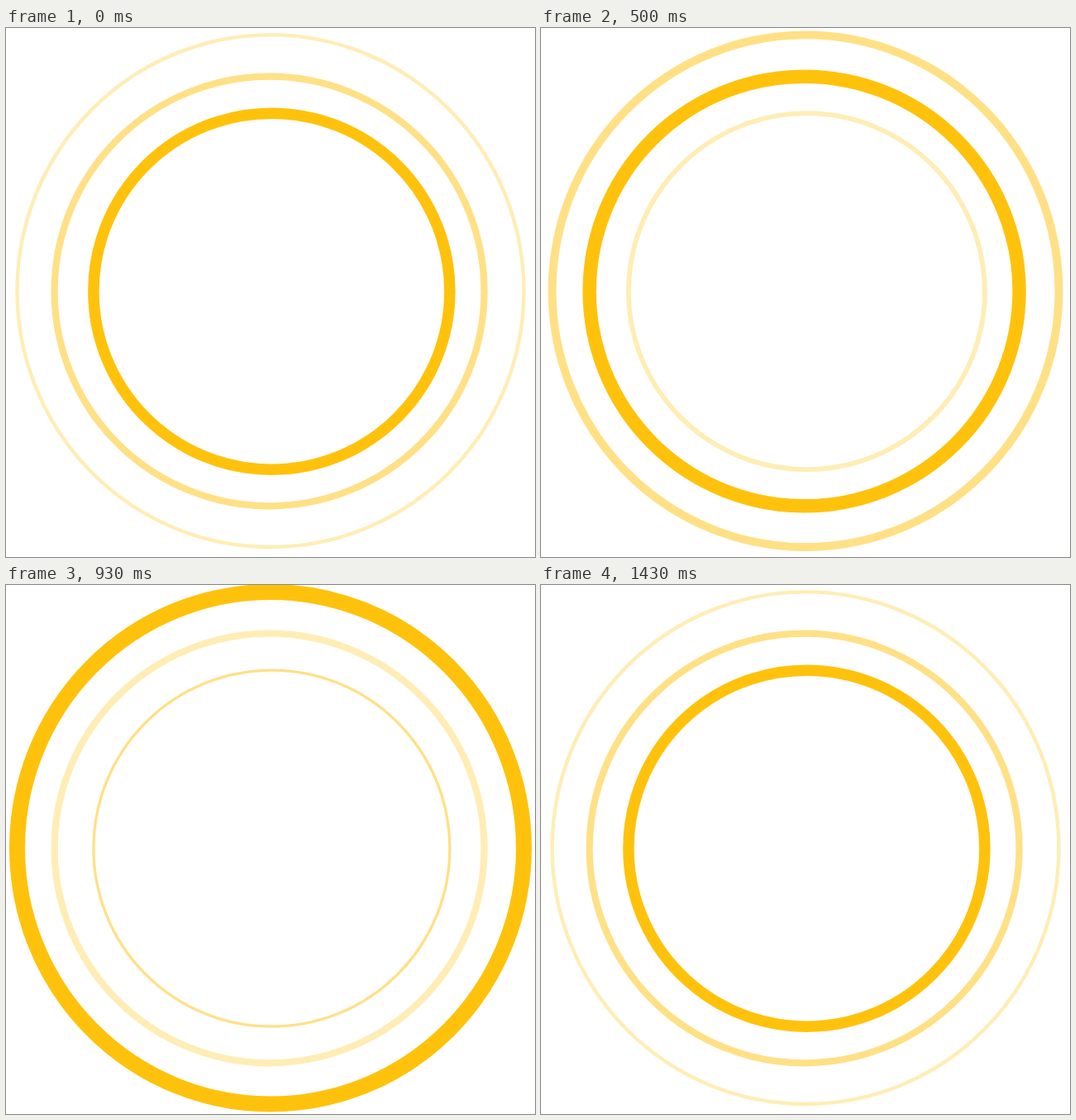
Animation of 640 by 640 pixels, one loop 1.93 s. Source, as an HTML page:

```html
<!DOCTYPE html>
<html lang="en">
<head>
<meta charset="utf-8">
<title>Pulsing rings</title>
<style>
  html, body { margin: 0; width: 100%; height: 100%; overflow: hidden; background: #fff; }
  svg { display: block; width: 100%; height: 100%; }
  ellipse { fill: none; stroke: #ffc20c; }
</style>
</head>
<body>
<svg viewBox="0 0 640 640">
  <ellipse cx="321.4" cy="318.7" rx="215.5" ry="215.5"/>
  <ellipse cx="318.6" cy="318.5" rx="260" ry="259.8"/>
  <ellipse cx="320" cy="318.2" rx="306.5" ry="309.8"/>
</svg>
<script>
const LOOP = 1930;
const FPS = 14;
const STEPS = 20;

// Every ring goes bright, faint, half; each starts one phase after the ring inside it
const OPACITY = [1, 0.3, 0.5];
const WIDTHS = [[13.5, 5.8, 3.3], [16.4, 8.2, 8.2], [19, 4.4, 9.9]];

const rings = [...document.querySelectorAll('ellipse')];
const lerp = (a, b, p) => a + (b - a) * p;

// Step at which a third of the pulse begins
const keyStep = k => Math.round(k * STEPS / 3);

// Start of a step in ms, on a 10 ms clock
const startOf = step => Math.round(step * 100 / FPS) * 10;

function stepAt(ms) {
  let step = STEPS;
  while (startOf(step) > ms) step--;
  return step;
}

function draw(ms) {
  const step = stepAt(ms);
  let k = 0;
  while (k < 2 && step >= keyStep(k + 1)) k++;
  const p = (step - keyStep(k)) / (keyStep(k + 1) - keyStep(k));

  rings.forEach((ring, i) => {
    const from = (k - i + 3) % 3;
    const to = (from + 1) % 3;
    const blend = values => lerp(values[from], values[to], p);
    ring.setAttribute('stroke-width', blend(WIDTHS[i]));
    ring.setAttribute('stroke-opacity', blend(OPACITY));
  });
}

const start = performance.now();
function tick() {
  draw((performance.now() - start) % LOOP);
  requestAnimationFrame(tick);
}
tick();
</script>
</body>
</html>
```
